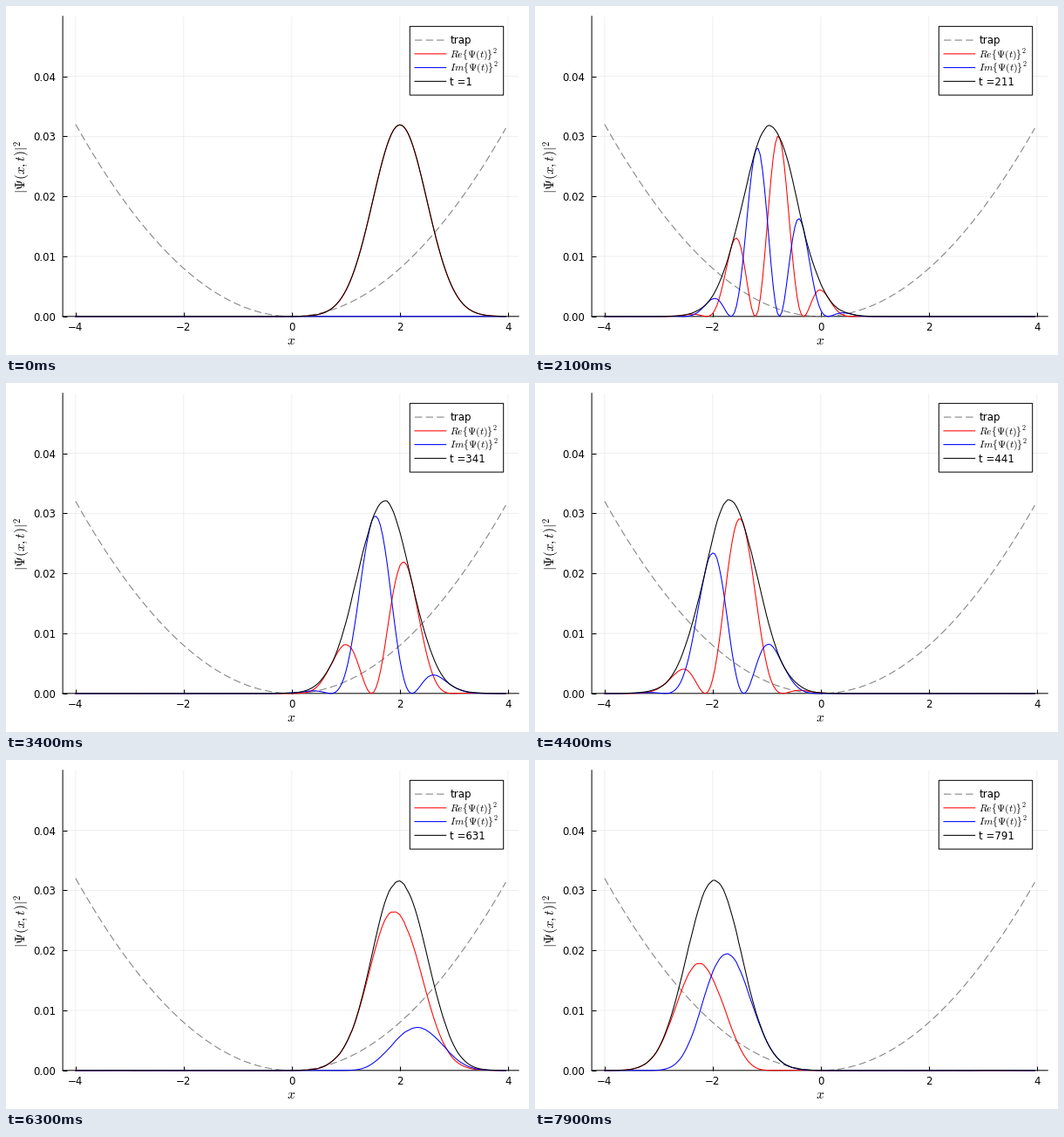
A matplotlib script for the animation above (8000 ms loop, 600x400 px).

```python
import numpy as np
import matplotlib.pyplot as plt
from matplotlib.animation import FuncAnimation
from matplotlib.lines import Line2D
from matplotlib.patches import Rectangle

W, H = 600, 400
PX = 0.72  # points per pixel at 100 dpi
FRAMES, STEPS = 80, 10

plt.rcParams.update({
    "font.family": "DejaVu Sans",
    "mathtext.fontset": "cm",
    "path.simplify": False,
    "path.snap": False,
})

# Split-step evolution of a displaced packet in a harmonic trap
N, DX, DT = 200, 0.04, 0.01
x = -4 + DX * np.arange(N)
k = 2 * np.pi * np.fft.fftfreq(N, DX) * N / (N - 1)
V = 2 * x**2
half_v = np.exp(-0.5j * V * DT)
kinetic = np.exp(-0.5j * k**2 * DT)


def evolve():
    psi = np.exp(-(x - 2) ** 2).astype(complex)
    psi /= np.sqrt(np.sum(np.abs(psi) ** 2))
    states = []
    for _ in range(FRAMES):
        states.append(psi.copy())
        for _ in range(STEPS):
            psi = half_v * np.fft.ifft(kinetic * np.fft.fft(half_v * psi))
    return states


states = evolve()

fig = plt.figure(figsize=(W / 100, H / 100), dpi=100, facecolor="white")
LEFT, RIGHT, TOP, BOTTOM = 65.1, 588.2, 11.8, 355.8
ax = fig.add_axes([LEFT / W, 1 - BOTTOM / H, (RIGHT - LEFT) / W, (BOTTOM - TOP) / H])
margin = 0.03 * (x[-1] - x[0])
ax.set_xlim(x[0] - margin, x[-1] + margin)
ax.set_ylim(0, 0.05)
ax.set_xticks([-4, -2, 0, 2, 4])
ax.set_yticks(np.arange(5) / 100)
ax.yaxis.set_major_formatter("{x:.2f}")
ax.set_axisbelow(True)
ax.grid(color="black", alpha=0.1, lw=0.6 * PX)
ax.tick_params(direction="in", length=5 * PX, width=PX, labelsize=11.8 * PX)
ax.tick_params(axis="x", pad=6 * PX)
ax.tick_params(axis="y", pad=7.5 * PX)
for side in ("top", "right"):
    ax.spines[side].set_visible(False)
for side in ("left", "bottom"):
    ax.spines[side].set_linewidth(PX)

DASH = (0, (8, 4))
STYLES = [("gray", DASH), ("red", "-"), ("blue", "-"), ("black", "-")]


def stroke(style):
    color, dash = style
    return dict(color=color, ls=dash, lw=PX * 1.05, dash_capstyle="butt")


def curve(y, style):
    return ax.plot(x, y, zorder=3, clip_on=False, **stroke(style))[0]


def label(px, py, text, size=11.8, **kw):
    return fig.text(px / W, 1 - py / H, text, fontsize=size * PX, zorder=12, **kw)


curve(V / 1000, STYLES[0])
re_line, im_line, rho_line = [curve(0 * x, s) for s in STYLES[1:]]

label((LEFT + RIGHT) / 2, 388.5, "$x$", 15.4, ha="center", va="baseline")
label(30, 184, r"$|\Psi(x,t)|^2$", 15.4, rotation=90, ha="right", va="center")

# Legend, laid out in pixels
ROW, PITCH = 39.1, 15.75
fig.add_artist(Rectangle((463.3 / W, 1 - (ROW + 4 * PITCH) / H),
                         107.4 / W, 5 * PITCH / H,
                         transform=fig.transFigure, fc="white", ec="black",
                         lw=PX, zorder=10))


def squared(part):
    # Calligraphic f and g hold the text-size braces in Computer Modern
    return rf"${part}\mathcal{{f}}\Psi(t)\mathcal{{g}}^2$"


names = ["trap", squared("Re"), squared("Im"), "t =1"]
for i, (name, style) in enumerate(zip(names, STYLES)):
    row = ROW + PITCH * i
    fig.add_artist(Line2D([469 / W, 504.7 / W], [1 - row / H] * 2,
                          transform=fig.transFigure, zorder=11, **stroke(style)))
    counter = label(509.2, row + 4.3, name, va="baseline")


def update(n):
    psi = states[n]
    re_line.set_ydata(psi.real**2)
    im_line.set_ydata(psi.imag**2)
    rho_line.set_ydata(np.abs(psi) ** 2)
    counter.set_text(f"t ={1 + STEPS * n}")
    return re_line, im_line, rho_line, counter


anim = FuncAnimation(fig, update, frames=FRAMES, interval=100,
                     repeat=True, repeat_delay=0, blit=False)
plt.show()
```
